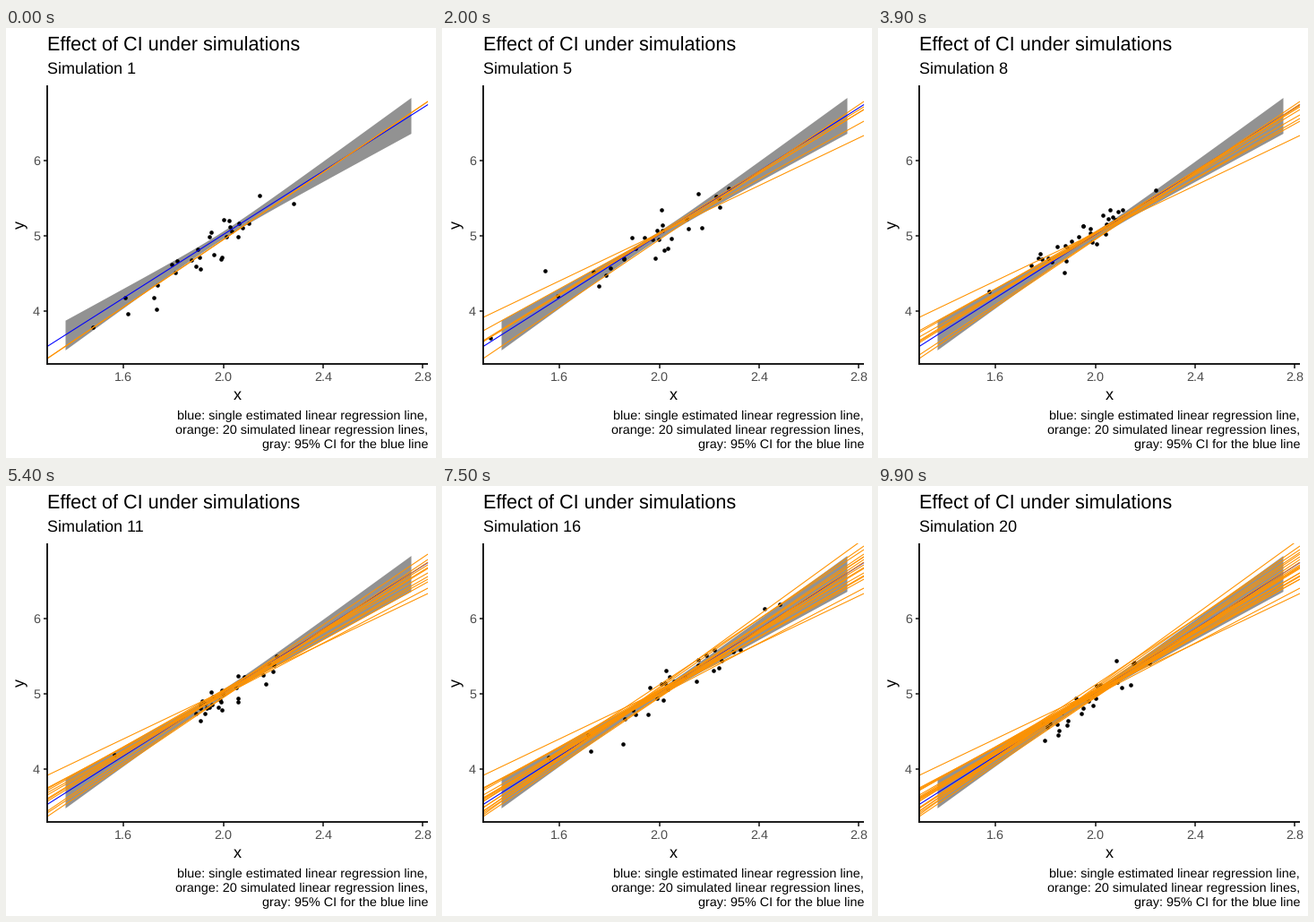
These frames come from a looping animation (480 px wide and 480 px high, 10 s). A matplotlib script:

```python
import numpy as np
import matplotlib.pyplot as plt
from matplotlib.animation import FuncAnimation
from matplotlib.collections import LineCollection
from matplotlib.patches import Rectangle

plt.rcParams["font.family"] = "Liberation Sans"
plt.rcParams["text.hinting"] = "none"

SIZE, DPI = 480, 100
PX = 72 / DPI                      # points per pixel
LEFT, RIGHT, TOP, BOTTOM = 46, 471, 63.5, 375
STATES, STEPS, POINTS = 20, 5, 30
ORANGE, GRAY, DARK = "#FF9300", "#929292", "#4D4D4D"
rng = np.random.default_rng(7)

# Heights of the simulated fits at the left and right panel edges
fit_left = [369, 349, 338, 323, 350, 365, 345, 340, 363, 352,
            337, 348, 352, 363, 367, 359, 347, 339, 360, 350]
fit_right = [82, 88, 104, 120, 91, 85, 101, 97, 76, 92,
             114, 100, 71, 67, 59, 79, 90, 104, 74, 97]
fits = np.column_stack([fit_left, fit_right]).astype(float)
estimate = (355.5, 85.5)


def height(x, ends):
    """Height at x of the line with the given edge heights."""
    return ends[0] + (x - LEFT) / (RIGHT - LEFT) * (ends[1] - ends[0])


def sample(ends):
    """Points scattered around one fit."""
    x = rng.normal(243, 58, POINTS)
    return np.column_stack([x, height(x, ends) + rng.normal(0, 14, POINTS)])


clouds = [sample(ends) for ends in fits]

fig = plt.figure(figsize=(SIZE / DPI, SIZE / DPI), dpi=DPI, facecolor="white")
ax = fig.add_axes([0, 0, 1, 1])
ax.set_xlim(0, SIZE)
ax.set_ylim(SIZE, 0)
ax.axis("off")
panel = Rectangle((LEFT, TOP), RIGHT - LEFT, BOTTOM - TOP, fc="none", ec="none")
ax.add_patch(panel)


def label(x, y, text, px, ha="left", color="black", **kw):
    kw.setdefault("va", "baseline")
    return ax.text(x, y, text, fontsize=px * PX, ha=ha, color=color, **kw)


def rule(xs, ys, color="black", width=1.75, z=5):
    ax.plot(xs, ys, color=color, lw=width * PX, zorder=z,
            solid_capstyle="butt")


# Confidence band, points and regression lines
band_x = np.linspace(66, 452, 80)
band_y = height(band_x, estimate)
half = np.hypot(4.2, 0.0923 * (band_x - 240))
ax.fill_between(band_x, band_y - half, band_y + half, color=GRAY, lw=0, zorder=1)
dots, = ax.plot([], [], "o", color="black", ms=4.6 * PX, mew=0, zorder=2)
dots.set_snap(False)
dots.set_clip_path(panel)
rule([LEFT, RIGHT], estimate, "#0000FF", 1.07, 3)
lines = LineCollection([], colors=ORANGE, linewidths=1.07 * PX, zorder=4)
ax.add_collection(lines, autolim=False)
lines.set_clip_path(panel)

# Axes
rule([LEFT, RIGHT], [BOTTOM, BOTTOM])
rule([LEFT, LEFT], [TOP, BOTTOM + 0.8])
for i in range(4):
    x = 131.3 + 111.27 * i
    rule([x, x], [BOTTOM, BOTTOM + 4.5], "#333333", z=4.5)
    label(x, 394, f"{1.6 + 0.4 * i:.1f}", 14.4, "center", DARK)
for i in range(3):
    y = 316 - 84.2 * i
    rule([LEFT - 4.5, LEFT], [y, y], "#333333", z=4.5)
    label(38, y + 5.2, str(4 + i), 14.4, "right", DARK)

# Text
label(46, 26, "Effect of CI under simulations", 21.6)
subtitle = label(46, 51, "", 18)
label(258.5, 415, "x", 18, "center")
label(16.5, 219, "y", 18, "center", rotation=90, va="center")
caption = ("blue: single estimated linear regression line,",
           "orange: 20 simulated linear regression lines,",
           "gray: 95% CI for the blue line")
for i, text in enumerate(caption):
    label(471, 437.4 + 15.6 * i, text, 14.4, "right")


def progress(step):
    """State index and how far it has moved towards the next one."""
    k, r = divmod(step, STEPS)
    moves = 2 if k == 0 else 1     # the first change takes one step more
    return k, max(0, r - STEPS + 1 + moves) / (moves + 1)


def draw(step):
    k, t = progress(step)
    nxt = (k + 1) % STATES
    moving = fits[k] + (fits[nxt] - fits[k]) * t
    lines.set_segments([[(LEFT, a), (RIGHT, b)]
                        for a, b in [*fits[:k + 1], moving]])
    dots.set_data(*(clouds[k] + (clouds[nxt] - clouds[k]) * t).T)
    subtitle.set_text(f"Simulation {(nxt if t > 0.5 else k) + 1}")
    return lines, dots, subtitle


anim = FuncAnimation(fig, draw, frames=STATES * STEPS, interval=100,
                     repeat=True, repeat_delay=0, blit=False)
plt.show()
```
